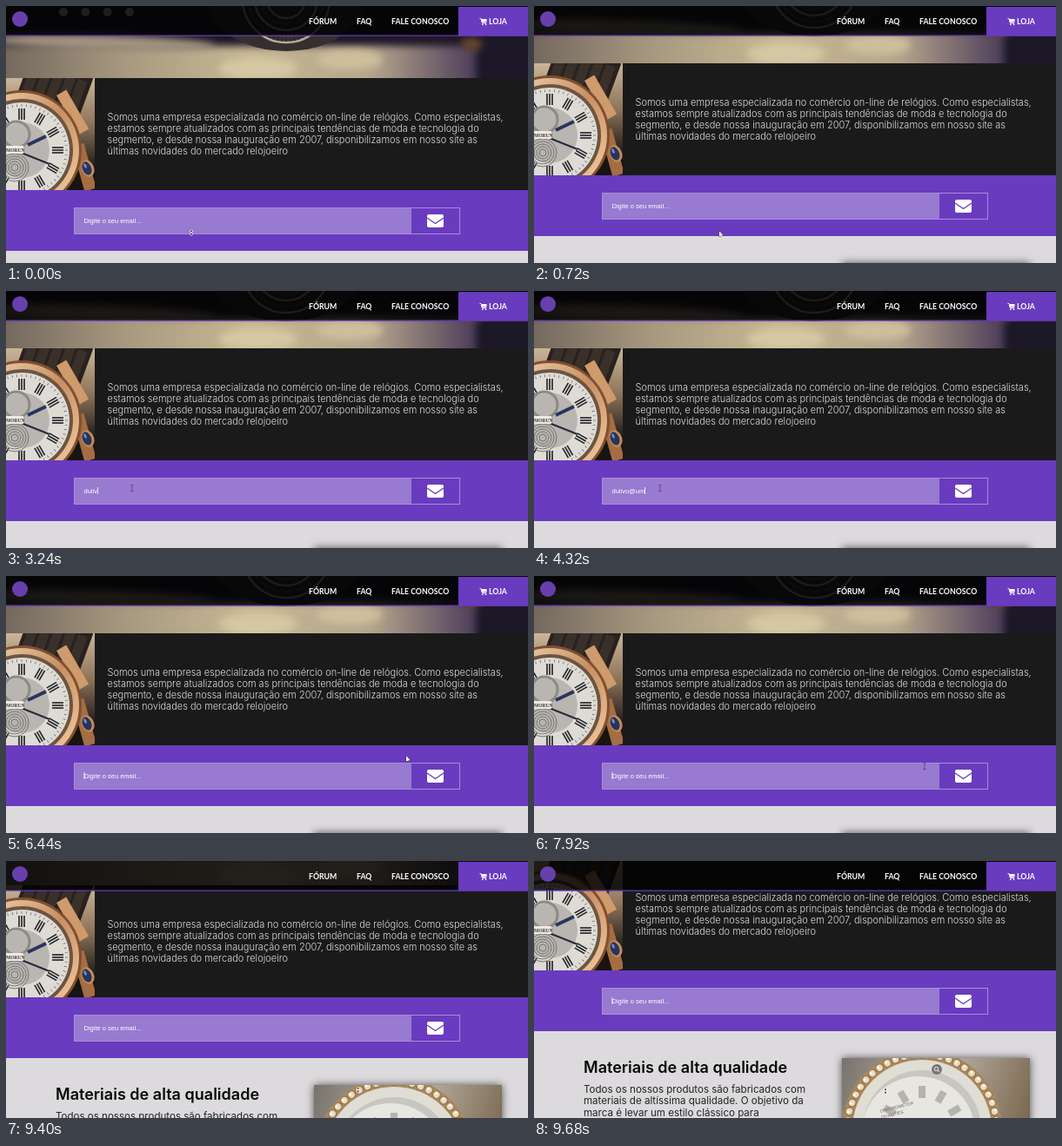
Write an HTML page with a canvas that moves like this. It is 600 px wide and 296 px high and loops after 9720 ms.

```html
<!DOCTYPE html>
<html lang="pt">
<head>
<meta charset="utf-8">
<title>Relojoaria</title>
<style>
html, body { margin: 0; width: 100%; height: 100%; overflow: hidden; background: #000; }
canvas { display: block; width: 600px; height: 296px; }
</style>
</head>
<body>
<canvas id="stage" width="600" height="296"></canvas>
<script>
const ctx = document.getElementById('stage').getContext('2d');
const LOOP = 9720, TAU = Math.PI * 2;
const PURPLE = '#693bbf';
const EMAIL = 'dulivo@umlo.test';
const TYPE_START = 2120, KEY_TIME = 255, SUBMIT = 6100;
const SCROLL_STOP = 700, SCROLL_START = 8640;

// Page layout, measured before any scrolling
const NAV = 34, ABOUT = 83, FORM = 212, MATERIALS = 282;

const clamp = k => Math.min(1, Math.max(0, k));
const smooth = k => k * k * (3 - 2 * k);

function scrollAt(t) {
  const settle = 1 - (1 - clamp(t / SCROLL_STOP)) ** 1.6;
  const speedUp = Math.max(0, (t - SCROLL_START) / 1040) ** 1.9;
  return 17 * settle + 68.5 * speedUp;
}

function mouseAt(t) {
  const pos = { x: 213, y: 261 };
  const glide = (from, to, x, y) => {
    const k = smooth(clamp((t - from) / (to - from)));
    pos.x += (x - pos.x) * k;
    pos.y += (y - pos.y) * k;
  };
  glide(SCROLL_STOP, 1500, 145, 227);
  glide(SUBMIT, 6420, 460, 209);
  glide(7700, 8450, 407, 258);
  glide(SCROLL_START, LOOP, 404, 265);
  return pos;
}

function rect(x, y, w, h, fill) {
  ctx.fillStyle = fill;
  ctx.fillRect(x, y, w, h);
}
function ellipse(x, y, rx, ry, fill, angle = 0) {
  ctx.fillStyle = fill;
  ctx.beginPath();
  ctx.ellipse(x, y, rx, ry, angle, 0, TAU);
  ctx.fill();
}
const disc = (x, y, r, fill) => ellipse(x, y, r, r, fill);
function ring(x, y, r, width, stroke) {
  ctx.strokeStyle = stroke;
  ctx.lineWidth = width;
  ctx.beginPath();
  ctx.arc(x, y, r, 0, TAU);
  ctx.stroke();
}
function line(points, stroke, width = 1) {
  ctx.strokeStyle = stroke;
  ctx.lineWidth = width;
  ctx.beginPath();
  points.forEach(p => ctx.lineTo(...p));
  ctx.stroke();
}
function text(str, x, y, font, fill) {
  ctx.font = font;
  ctx.fillStyle = fill;
  ctx.fillText(str, x, y);
}
function paragraph(lines, x, y, step, font, fill) {
  lines.forEach((s, i) => text(s, x, y + i * step, font, fill));
}
function gradient(x0, y0, x1, y1, ...colors) {
  const g = ctx.createLinearGradient(x0, y0, x1, y1);
  colors.forEach((c, i) => g.addColorStop(i / (colors.length - 1), c));
  return g;
}
function placed(x, y, angle, draw) {
  ctx.save();
  ctx.translate(x, y);
  ctx.rotate(angle);
  draw();
  ctx.restore();
}
function clipped(x, y, w, h, draw) {
  ctx.save();
  ctx.beginPath();
  ctx.rect(x, y, w, h);
  ctx.clip();
  draw();
  ctx.restore();
}
function around(x, y, r, count, draw) {
  for (let i = 0; i < count; i++) {
    const a = i * TAU / count;
    placed(x + Math.cos(a) * r, y + Math.sin(a) * r, a + Math.PI / 2, () => draw(i));
  }
}

function hero() {
  clipped(0, 0, 600, ABOUT, () => {
    rect(0, 0, 600, ABOUT, '#1d1828');
    ctx.filter = 'blur(4px)';
    rect(-20, 46, 560, 60, gradient(0, 0, 560, 0, '#75695f', '#a89a80', '#c6b893', '#b5a58c', '#3b2c52'));
    ellipse(110, 42, 130, 9, '#a39580', .03);
    ellipse(290, 72, 45, 13, '#d4c7a2');
    ellipse(395, 62, 38, 11, '#cdbf9c');
    ellipse(535, 44, 12, 8, '#67452f');
    ctx.filter = 'none';
    ellipse(322, -8, 90, 60, '#35302f');
    for (let i = 0; i < 5; i++) ring(322, -8, 50 - i * 7, 2.5, i % 2 ? '#4b4542' : '#b3aaa0');
    around(322, -8, 44, 60, () => rect(-.5, -5, 1, 10, '#2b2725'));
  });
  for (let i = 0; i < 4; i++) disc(66 + i * 25.3, 7, 5, '#bbb');
}

function dial(x, y, r) {
  disc(x, y, r + 14, '#80502f');
  disc(x, y, r + 11, gradient(x - r, y - r, x + r, y + r, '#ecd0ac', '#c88f63', '#f0c79c'));
  disc(x, y, r + 4, '#6d5440');
  disc(x, y, r, '#dedbd5');
  around(x, y, r - 4, 60, () => rect(-.3, -2, .6, 3, '#4f4d4b'));
  around(x, y, r - 14, 12, () => [-3, 0, 3].forEach(d => rect(d - .8, -7, 1.6, 13, '#202126')));
  disc(x, y, r - 23, '#b9b5b0');
  for (let i = 0; i < 5; i++) ring(x - 8, y + 20, 16 - i * 3, 1, '#77736f');
  ring(x - 6, y - 18, 15, 3, '#8d8984');
  line([[x + 7, y - 6], [x + 28, y - 16]], '#26365f', 4);
  line([[x - 8, y], [x + 32, y + 16]], '#262a3b', 2);
}

function wristwatch() {
  clipped(0, ABOUT, 102, FORM - ABOUT, () => {
    rect(0, ABOUT, 102, 130, gradient(0, ABOUT, 0, 190, '#cbb598', '#8c7359', '#171412'));
    placed(58, 100, .35, () => {
      rect(-42, -30, 76, 56, '#28211e');
      for (let i = 0; i < 5; i++) rect(-38 + i * 14, -24, 11, 34, '#3a302a');
    });
    placed(77, 122, 1.05, () => rect(-26, -6, 52, 13, '#cf9a6c'));
    placed(92, 186, 1.3, () => rect(-28, -5, 54, 14, '#a46d42'));
    dial(18, 166, 55);
    rect(0, 161, 20, 9, '#eeeae2');
    text('MORUN', 0, 168, '700 5.5px "Liberation Serif", serif', '#373536');
    ellipse(94, 187, 7, 10, '#c48c5b', -.4);
    ellipse(93, 187, 5, 8, '#26335f', -.4);
    ellipse(91, 184, 1.5, 3, '#7889bd', -.4);
  });
}

function about() {
  rect(0, ABOUT, 600, FORM - ABOUT, '#1a1a1b');
  wristwatch();
  paragraph([
    'Somos uma empresa especializada no comércio on-line de relógios. Como especialistas,',
    'estamos sempre atualizados com as principais tendências de moda e tecnologia do',
    'segmento, e desde nossa inauguração em 2007, disponibilizamos em nosso site as',
    'últimas novidades do mercado relojoeiro'
  ], 116.5, 132, 13, '300 11px Inter, sans-serif', '#dedede');
}

function envelope(x, y) {
  ctx.fillStyle = '#fff';
  ctx.beginPath();
  ctx.roundRect(x, y, 19, 15, 2);
  ctx.fill();
  line([[x, y + 4], [x + 9.5, y + 10.5], [x + 19, y + 4]], PURPLE, 1.3);
}

function newsletter(t) {
  rect(0, FORM, 600, MATERIALS - FORM, PURPLE);
  rect(78, 232, 388, 31, '#987ad0');
  ctx.strokeStyle = '#a98cd9';
  ctx.lineWidth = 1;
  ctx.strokeRect(78.5, 232.5, 443, 30);
  rect(466, 233, 55, 29, PURPLE);
  envelope(484, 240);

  const typing = t >= TYPE_START && t < SUBMIT;
  const typed = typing ? EMAIL.slice(0, 1 + Math.floor((t - TYPE_START) / KEY_TIME)) : '';
  text(typed || 'Digite o seu email...', 89.5, 249.6, '7.5px "Liberation Sans", Arial, sans-serif', '#fff');
  const focused = t > 1560;
  const blinkOn = (t + 570) % 1000 < 500;
  if (typing || focused && blinkOn) {
    rect(89.5 + (typed && ctx.measureText(typed).width), 243, .8, 8, '#fff');
  }
}

function diamondWatch() {
  rect(354, 313, 216, 140, gradient(354, 313, 570, 380, '#77736c', '#bbb4a9', '#7b6850'));
  const x = 446, y = 395;
  disc(x, y, 92, '#a98a60');
  disc(x, y, 80, '#e0ddd5');
  disc(x, y, 68, '#c8c6c1');
  disc(x - 4, y + 4, 65, '#e8e6e1');
  around(x, y, 86, 52, () => {
    disc(0, 0, 5, '#9b7545');
    disc(0, 0, 3.7, '#e8dac2');
    disc(-1, -1, 1.3, '#fff');
  });
  around(x, y, 42, 12, () => rect(-4, -8, 8, 14, '#b6b3ad'));
  placed(398, 376, -.25, () => {
    const font = '5px "Liberation Sans", sans-serif';
    paragraph(['CHRONOMETER', 'QUALITIES'], 0, 0, 7, font, '#69645e');
  });
}

function materials(t) {
  rect(0, MATERIALS, 600, 200, '#dcdadc');
  text('Materiais de alta qualidade', 57, 330, '600 18.05px Inter, sans-serif', '#080808');
  paragraph([
    'Todos os nossos produtos são fabricados com',
    'materiais de altíssima qualidade. O objetivo da',
    'marca é levar um estilo clássico para'
  ], 57, 353, 13.3, '400 11.55px Inter, sans-serif', '#242424');

  ctx.save();
  ctx.shadowColor = 'rgba(0,0,0,.65)';
  ctx.shadowBlur = 9;
  rect(354, 313, 216, 140, '#98948e');
  ctx.restore();
  clipped(354, 313, 216, 140, diamondWatch);
  if (t > 9520) {
    disc(463, 326, 6, '#777');
    ring(462.5, 325.5, 2.2, 1, '#eee');
    line([[464, 327], [466, 329]], '#eee');
  }
}

function cart(x, y) {
  line([[x, y], [x + 1.5, y], [x + 3, y + 5], [x + 7.5, y + 5]], '#fff');
  rect(x + 2, y + .5, 6, 3.5, '#fff');
  [3.3, 7].forEach(d => disc(x + d, y + 6.7, .9, '#fff'));
}

function navigation() {
  rect(0, 0, 600, NAV, 'rgba(0,0,0,.84)');
  rect(0, NAV - .5, 600, 1.2, PURPLE);
  disc(16, 15, 9, '#6740ad');
  rect(520, 1, 80, NAV - .5, PURPLE);
  cart(544.5, 14.5);
  const item = (label, x) => text(label, x, 21.2, '700 8.75px Lato, sans-serif', '#fff');
  item('FÓRUM', 348);
  item('FAQ', 403);
  item('FALE CONOSCO', 443);
  item('LOJA', 555);
}

function pointer(t, { x, y }) {
  const autoscroll = t < SCROLL_STOP || t > SCROLL_START;
  const overInput = x > 78 && x < 466 && y > 214 && y < 246;
  if (autoscroll) {
    [-1.7, 1.7].forEach(d => {
      disc(x, y + d, 1.8, '#eee');
      disc(x, y + d, 1, '#333');
    });
  } else if (overInput) {
    rect(x - .4, y - 3.5, .8, 7, '#51436b');
    [-3.5, 3.5].forEach(d => rect(x - 1.5, y + d - .4, 3, .8, '#51436b'));
  } else {
    const arrow = [[x, y - 2], [x, y + 4.5], [x + 4.5, y + 3], [x, y - 2]];
    line(arrow, '#222', 1);
    ctx.fillStyle = '#fff';
    ctx.fill();
  }
}

function draw(t) {
  rect(0, 0, 600, 296, '#000');
  ctx.save();
  ctx.translate(0, -Math.round(scrollAt(t)));
  hero();
  about();
  materials(t);
  newsletter(t);
  ctx.restore();
  navigation();
  pointer(t, mouseAt(t));
}

const start = performance.now();
function tick() {
  draw((performance.now() - start) % LOOP);
  requestAnimationFrame(tick);
}
tick();
</script>
</body>
</html>
```
